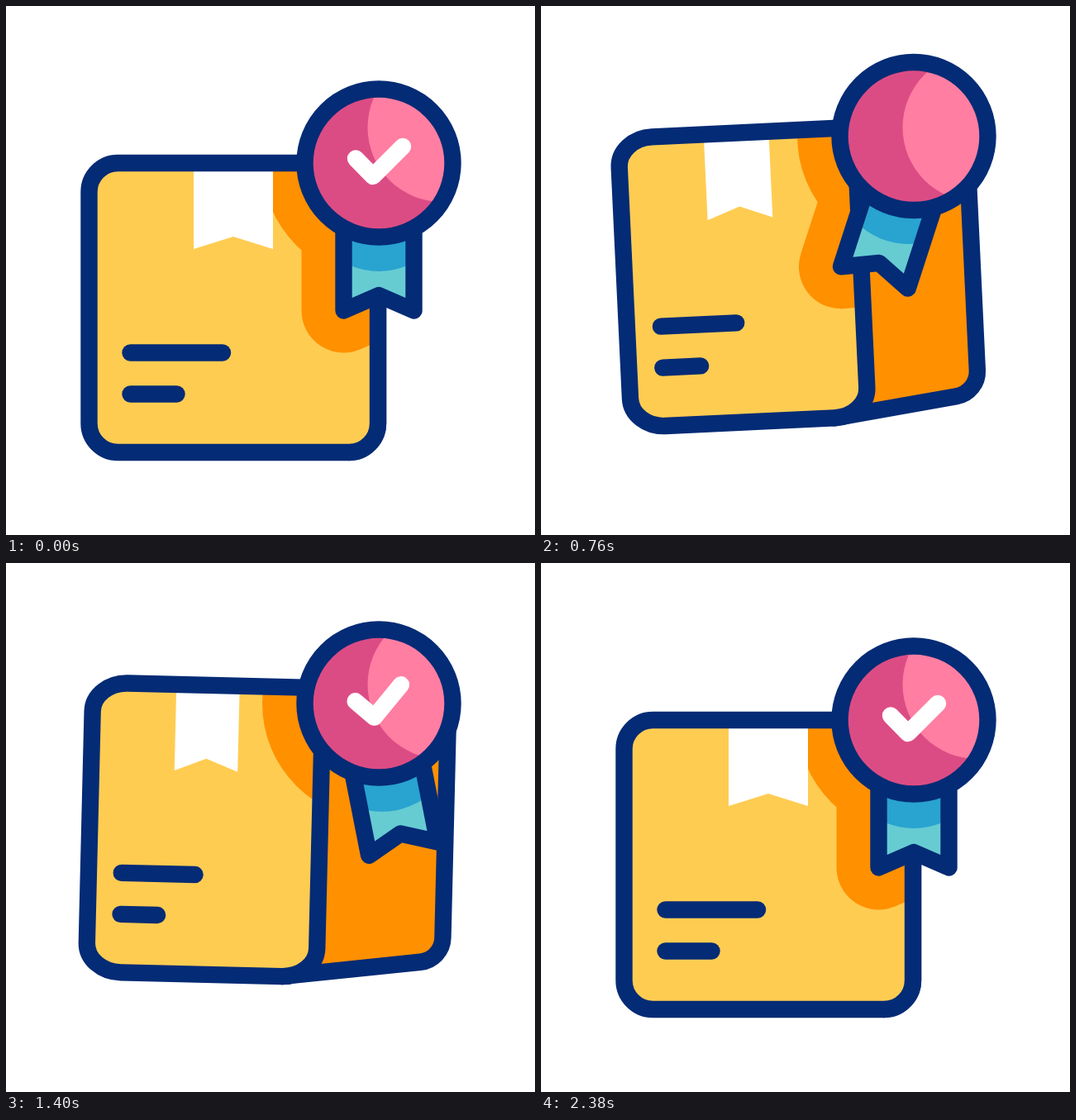
Recreate the animation shown at these times as an HTML page with a canvas. Size 640 by 640 pixels, loop 2.4 s.

```html
<!DOCTYPE html>
<html lang="en">
<head>
<meta charset="utf-8">
<title>Approved parcel</title>
<style>
  html, body { margin: 0; width: 100%; height: 100%; overflow: hidden; background: #fff; }
  canvas { display: block; width: 100vw; height: 100vh; }
</style>
</head>
<body>
<canvas id="stage" width="640" height="640"></canvas>
<script>
const ctx = document.getElementById('stage').getContext('2d');
const LOOP = 2400;
const RAD = Math.PI / 180;
const NAVY = '#042b75', YELLOW = '#ffcc52', ORANGE = '#ff9000', PINK = '#dc4c84',
      ROSE = '#ff7ea2', BLUE = '#29a3d0', TEAL = '#66ccd2', WHITE = '#fff';

const progress = (t, start, end) => Math.min(1, Math.max(0, (t - start) / (end - start)));
const smooth = u => u * u * (3 - 2 * u);
const cubic = u => u < .5 ? 4 * u ** 3 : 1 - 4 * (1 - u) ** 3;
const ease = (t, start, end) => cubic(progress(t, start, end));
const bump = (t, start, end) => Math.sin(Math.PI * progress(t, start, end)) ** 2;

// Sways through evenly timed turning points; the first leg ends at `first`.
function sway(t, first, step, points) {
  return points.reduce((value, point, i) => {
    const end = first + (i - 1) * step;
    const start = i === 1 ? 0 : end - step;
    return value + (point - points[i - 1]) * smooth(progress(t, start, end));
  });
}

const poseAt = t => ({
  turn: ease(t, 120, 1065) - ease(t, 1215, 2295),
  lift: -59 * bump(t, 560, 1210) - 41.5 * bump(t, 1210, 1640),
  lean: -5.15 * bump(t, 580, 1280) + 1.4 * bump(t, 1180, 1640),
  y: sway(t, 395, 330, [190, 235, 154.5, 244.5, 169.7, 219, 190]),
  swing: sway(t, 380, 480, [0, -36.5, 24.7, -11.8, 3.2, 0]),
  tick: 1 - ease(t, 40, 634) + ease(t, 900, 1229)
});

function polyline(...points) {
  const path = new Path2D();
  points.forEach(([x, y]) => path.lineTo(x, y));
  return path;
}

function polygon(...points) {
  const path = polyline(...points);
  path.closePath();
  return path;
}

function disc(x, y, r) {
  const path = new Path2D();
  path.arc(x, y, r, 0, 2 * Math.PI);
  return path;
}

function fill(path, color) {
  ctx.fillStyle = color;
  ctx.fill(path);
}

function stroke(path, color = NAVY, width = 20.4) {
  ctx.strokeStyle = color;
  ctx.lineWidth = width;
  ctx.stroke(path);
}

function clipped(path, draw) {
  ctx.save();
  ctx.clip(path);
  draw();
  ctx.restore();
}

function rotated(x, y, degrees, draw) {
  ctx.save();
  ctx.translate(x, y);
  ctx.rotate(degrees * RAD);
  draw();
  ctx.restore();
}

const LEFT = 100.5, TOP = 190, BOTTOM = 540, WIDTH = 349.5;

// The turning box has wider corners, except at the top where the side joins.
function frontPath(right, wide, narrow) {
  const ry = 35, path = new Path2D();
  const corner = (x, y, rx, quarter) =>
    path.ellipse(x, y, rx, ry, 0, quarter * Math.PI / 2, (quarter + 1) * Math.PI / 2);
  corner(right - wide, BOTTOM - ry, wide, 0);
  corner(LEFT + wide, BOTTOM - ry, wide, 1);
  corner(LEFT + wide, TOP + ry, wide, 2);
  corner(right - narrow, TOP + ry, narrow, 3);
  path.closePath();
  return path;
}

function sidePath(nearTop, nearBottom, far, r) {
  const slope = Math.tan(7.3 * RAD), path = new Path2D();
  const top = TOP + (far - nearTop) * slope;
  const bottom = BOTTOM - (far - nearBottom) * slope;
  path.moveTo(nearTop, TOP);
  path.arcTo(far, top, far, 365, r);
  path.arcTo(far, bottom, nearBottom, BOTTOM, r);
  path.lineTo(nearBottom, BOTTOM);
  path.closePath();
  return path;
}

// Ribbon relative to its pivot, just below the middle of the badge.
const BADGE_X = 451, PIVOT = 24;
const ribbon = polygon([-42.5, 30], [-42.5, 154.5], [0, 136], [42.5, 154.5], [42.5, 30]);

function drawBadgeShadow({ y, swing }) {
  fill(disc(BADGE_X, y, 141), ORANGE);
  rotated(BADGE_X, y + PIVOT, swing, () => {
    fill(ribbon, ORANGE);
    stroke(ribbon, ORANGE, 102);
  });
}

function drawBox(pose) {
  const k = pose.turn;
  const right = LEFT + WIDTH - 72.5 * k;
  const far = right + 155 * k;
  const wide = 35 + 7 * k, narrow = 35 - 11 * k;
  const px = x => LEFT + (x - LEFT) * (right - LEFT) / WIDTH;
  const front = frontPath(right, wide, narrow);
  const side = sidePath(right - narrow, right - wide, far, 35 - 5 * k);

  rotated(320 + 0.7 * k, 365 + pose.lift, pose.lean, () => {
    ctx.translate(-320, -365);
    fill(side, ORANGE);
    stroke(side);
    fill(front, YELLOW);
    clipped(front, () => {
      ctx.save();
      ctx.resetTransform();
      drawBadgeShadow(pose);
      ctx.restore();
      fill(polygon([px(227), TOP], [px(227), 294], [px(275), 279], [px(323), 294], [px(323), TOP]), WHITE);
    });
    stroke(polyline([px(150.5), 419.5], [px(262), 419.5]));
    stroke(polyline([px(150.5), 469.5], [px(206.5), 469.5]));
    stroke(front);
  });
}

function drawTick(amount) {
  if (amount < 0.002) return;
  const a = [-28, -5.5], b = [-7, 16], c = [29, -20];
  const distance = (p, q) => Math.hypot(q[0] - p[0], q[1] - p[1]);
  const along = (p, q, u) => [p[0] + (q[0] - p[0]) * u, p[1] + (q[1] - p[1]) * u];
  const first = distance(a, b), second = distance(b, c);
  const length = amount * (first + second);
  const corner = along(a, b, Math.min(1, length / first));
  const tip = length > first ? along(b, c, (length - first) / second) : corner;
  stroke(polyline(a, corner, tip), WHITE);
}

function drawBadge({ y, swing, tick }) {
  const face = disc(BADGE_X, y, 89.5);
  const half = swing / 2 * RAD;

  rotated(BADGE_X, y + PIVOT, swing, () => {
    fill(ribbon, TEAL);
    clipped(ribbon, () => {
      ctx.rotate(-swing * RAD);
      fill(disc(-42.7 * Math.sin(half), 42.7 * Math.cos(half) - PIVOT, 88.3), BLUE);
    });
    stroke(ribbon);
  });

  fill(face, PINK);
  clipped(face, () => fill(disc(527.5, 147, 90), ROSE));
  stroke(face);
  rotated(BADGE_X, y, swing / 2, () => drawTick(tick));
}

function render(time) {
  const pose = poseAt(time % LOOP);
  ctx.clearRect(0, 0, 640, 640);
  drawBox(pose);
  drawBadge(pose);
}

ctx.lineCap = ctx.lineJoin = 'round';
const start = performance.now();
function loop() {
  render(performance.now() - start);
  requestAnimationFrame(loop);
}
loop();
</script>
</body>
</html>
```
